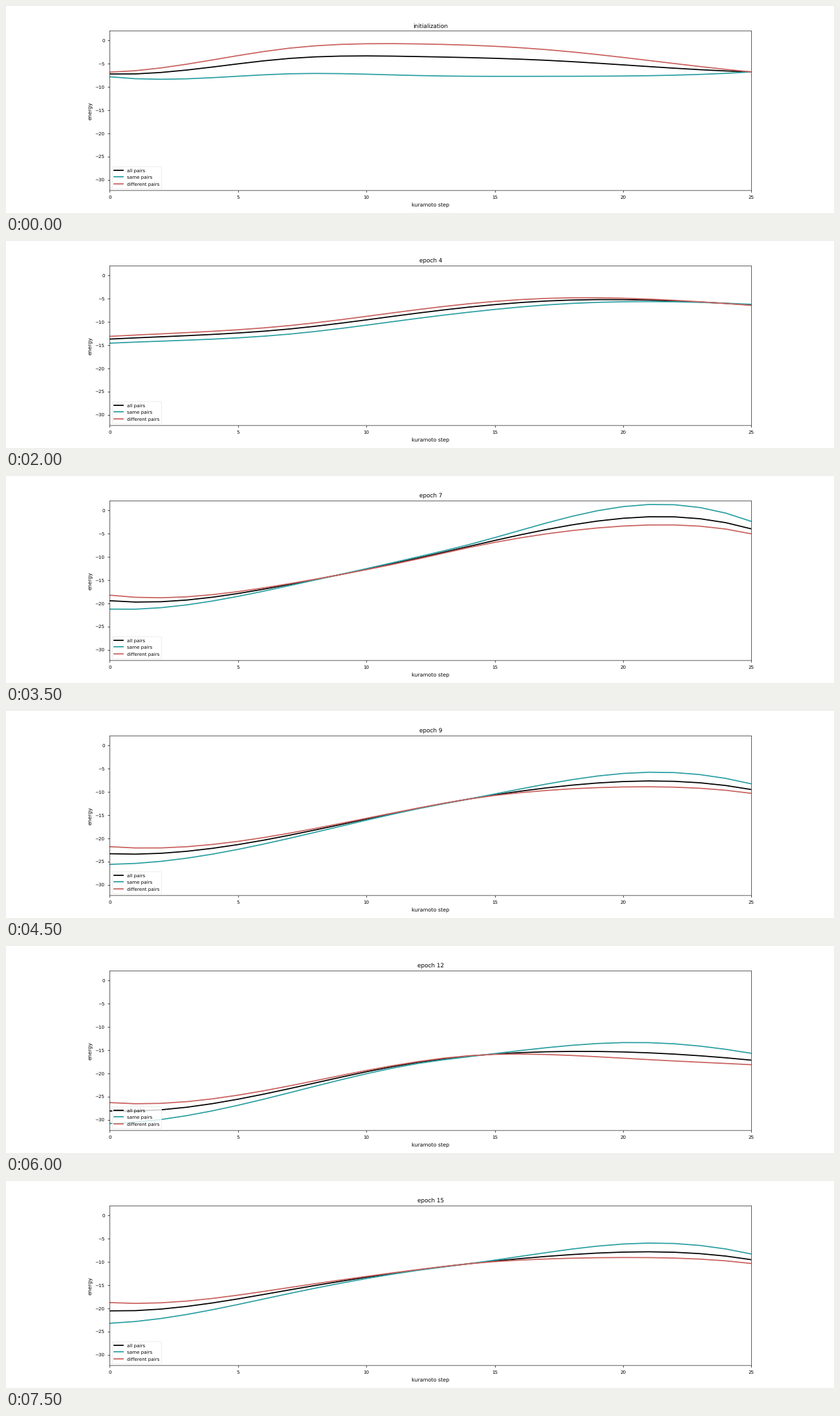
A matplotlib script that plays this animation: 1280 by 320 pixels, repeating every 8000 ms.

```python
import numpy as np
import matplotlib.pyplot as plt
from matplotlib.animation import FuncAnimation

plt.rcParams["font.family"] = "DejaVu Sans"
plt.rcParams["text.hinting"] = "none"

EPOCHS = 16
STEPS = np.arange(26)
KNOTS = np.array([0, 3, 7, 12, 17, 21, 25])
SAME_SHARE = 0.4  # weight of same pairs in the overall mean

# Mean energy at the knots for key epochs, the rest is blended
MEAN = {
    0: [-7.25, -6.4, -3.9, -3.5, -4.3, -5.65, -6.8],
    2: [-3.05, -3.55, -1.65, 0.1, -1.0, -1.1, -0.35],
    5: [-19.05, -17.7, -16.5, -12.25, -7.8, -7.45, -9.4],
    7: [-19.45, -19.3, -15.95, -10.3, -4.15, -1.4, -4.0],
    11: [-23.85, -22.95, -19.4, -13.5, -10.85, -10.6, -11.7],
    13: [-26.05, -25.35, -20.9, -15.5, -13.6, -14.3, -16.35],
    15: [-20.55, -19.6, -16.05, -11.75, -8.85, -7.85, -9.55],
}
# Same minus different: early decay, late hump, overall arch
GAP = {
    0: (-1.0, 0.0, -6.8),
    2: (0.0, 0.5, 0.4),
    5: (-2.2, 0.3, -3.0),
    7: (-3.0, 4.2, 0.5),
    11: (-4.6, 2.2, -0.7),
    13: (-4.4, 5.5, 0.0),
    15: (-4.45, 3.2, -0.1),
}
# Epochs that dip below the blend, with their lowest energy
DIPS = {1: -14.7, 3: -15.9, 9: -25.6, 12: -30.8, 14: -24.7}


def blend(table, epoch):
    keys = sorted(table)
    return [np.interp(epoch, keys, col) for col in zip(*(table[k] for k in keys))]


def basis(x):
    """Truncated power basis of a not-a-knot cubic spline."""
    u, k = np.asarray(x) / 25, KNOTS[2:-2] / 25
    powers = [u**p for p in range(4)]
    return np.column_stack(powers + [np.clip(u - c, 0, None)**3 for c in k])


def spline(values):
    return basis(STEPS) @ np.linalg.solve(basis(KNOTS), values)


def spread(decay, hump, arch):
    early = np.clip(1 - STEPS / 13, 0, None)**1.7
    late = np.sin(np.pi * np.clip(STEPS - 13, 0, None) / 17)**2
    return decay * early + hump * late + arch * np.sin(np.pi * STEPS / 25)


def curves(epoch):
    mean = spline(blend(MEAN, epoch))
    gap = spread(*blend(GAP, epoch))
    trio = np.array([mean, mean + (1 - SAME_SHARE) * gap, mean - SAME_SHARE * gap])
    return trio + DIPS.get(epoch, trio.min()) - trio.min()


fig, ax = plt.subplots(figsize=(20, 5), dpi=64)
fig.subplots_adjust(left=0.12525, right=0.90025, bottom=0.109, top=0.879)

styles = [("all pairs", "black"), ("same pairs", "#2c9fa2"),
          ("different pairs", "#c9625f")]
lines = [ax.plot(STEPS, 0 * STEPS, color=color, lw=2, label=label)[0]
         for label, color in styles]

for spine in ax.spines.values():
    spine.set_linewidth(0.72)
    spine.set_snap(False)
ax.set_xlim(0, 25)
ax.set_ylim(-32.285, 1.985)
ax.set_xticks(range(0, 26, 5))
ax.set_yticks(range(-30, 1, 5))
ax.tick_params(labelsize=8, pad=5)
ax.set_xlabel("kuramoto step", fontsize=9)
ax.set_ylabel("energy", fontsize=9)
title = ax.set_title("initialization", fontsize=10)
ax.legend(loc="lower left", fontsize=8, framealpha=0.8, edgecolor="0.9")


def update(epoch):
    for line, ys in zip(lines, curves(epoch)):
        line.set_ydata(ys)
    title.set_text(f"epoch {epoch}" if epoch else "initialization")
    return [*lines, title]


anim = FuncAnimation(fig, update, frames=EPOCHS, interval=500,
                     repeat=True, repeat_delay=0, blit=False)
plt.show()
```
